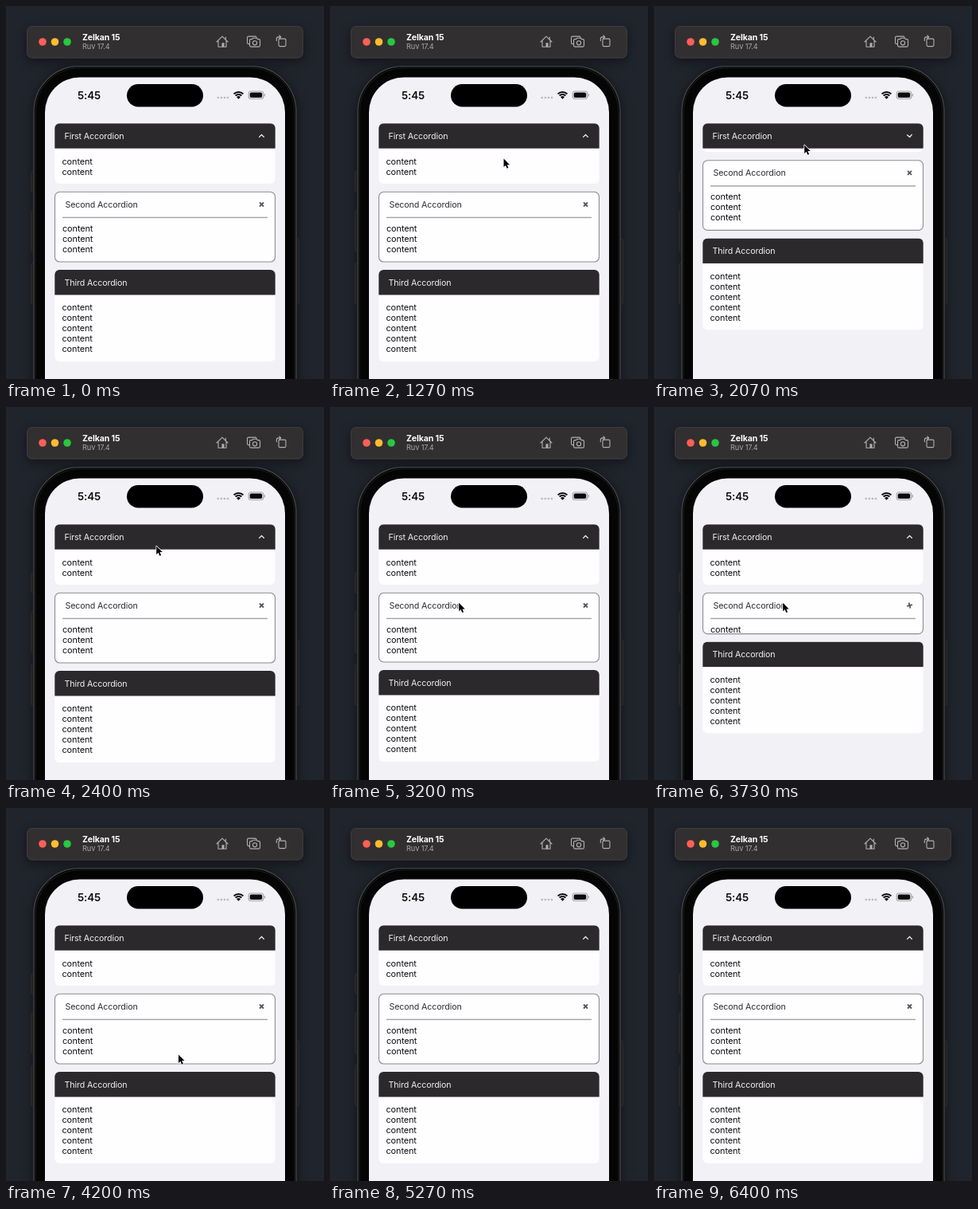
Recreate the animation shown at these times as an HTML page with a canvas. Size 400x468 px, loop 6.67 s.

```html
<!DOCTYPE html>
<html lang="en">
<head>
<meta charset="utf-8">
<title>Accordion demo</title>
<style>
html, body { margin: 0; width: 100%; height: 100%; overflow: hidden; background: #20242c; }
canvas { display: block; width: 400px; height: 468px; }
</style>
</head>
<body>
<canvas id="stage"></canvas>
<script>
const W = 400, H = 468, LOOP = 6670, FPS = 15;
const canvas = document.getElementById('stage');
const ctx = canvas.getContext('2d');
const dpr = window.devicePixelRatio || 1;
canvas.width = W * dpr;
canvas.height = H * dpr;

const FONT = 'Inter, Roboto, sans-serif';
const DARK = '#2c292c', PAPER = '#fefdff';
const TOGGLE = 400, HEADER = 31.5;

// Cursor path: time, x, y
const PATH = [
  [733, 250, 409], [933, 242, 322], [1133, 228, 228], [1267, 218, 191],
  [1333, 207, 184], [1467, 188.7, 174], [2400, 188.7, 174], [2600, 177, 207],
  [2800, 161, 245], [3000, 161.7, 245.3], [3930, 161.7, 245.3], [4200, 216.5, 309],
  [4333, 240, 405]
];

const clamp = v => Math.max(0, Math.min(1, v));
const ease = u => u < 0.5 ? 2 * u * u : 1 - 2 * (1 - u) * (1 - u);
const smooth = u => u * u * (3 - 2 * u);

function openness(t, closeAt, openAt) {
  return t < openAt ? 1 - ease(clamp((t - closeAt) / TOGGLE)) : ease(clamp((t - openAt) / TOGGLE));
}

function box(x, y, w, h, r, fill, stroke, lw = 1) {
  ctx.beginPath();
  ctx.roundRect(x, y, w, h, r);
  if (fill) { ctx.fillStyle = fill; ctx.fill(); }
  if (stroke) { ctx.strokeStyle = stroke; ctx.lineWidth = lw; ctx.stroke(); }
}

function disc(x, y, r, fill) {
  ctx.beginPath();
  ctx.arc(x, y, r, 0, Math.PI * 2);
  ctx.fillStyle = fill;
  ctx.fill();
}

function text(str, x, y, color, size = 10.65, weight = 400) {
  ctx.font = `${weight} ${size}px ${FONT}`;
  ctx.letterSpacing = '-0.1px';
  ctx.fillStyle = color;
  ctx.fillText(str, x, y);
}

function line(d, color, lw) {
  ctx.strokeStyle = color;
  ctx.lineWidth = lw;
  ctx.stroke(new Path2D(d));
}

function placed(x, y, angle, draw) {
  ctx.save();
  ctx.translate(x, y);
  ctx.rotate(angle);
  draw();
  ctx.restore();
}

function shadowed(blur, dy, color, draw) {
  ctx.save();
  ctx.shadowColor = color;
  ctx.shadowBlur = blur * dpr;
  ctx.shadowOffsetY = dy * dpr;
  draw();
  ctx.restore();
}

function toolbar() {
  shadowed(14, 4, 'rgba(0,0,0,.45)', () => box(26, 25, 348, 40.5, 7, '#322f31'));
  box(26.5, 25.5, 347, 39.5, 6.5, null, '#3f3c3e');
  ['#ff5f57', '#febc2e', '#28c840'].forEach((c, i) => disc(46 + i * 15.5, 45, 4.8, c));
  text('Zelkan 15', 96, 43, '#fff', 10.5, 700);
  text('Ruv 17.4', 96, 54.2, '#aaa7a9', 9.2);

  const grey = '#b3b0b2';
  ctx.lineJoin = ctx.lineCap = 'round';
  line('M265 45 L272 38.2 L279 45 M267 43.5 V51.3 H277 V43.5 M276.3 42 V39', grey, 1.1);
  box(271.5, 46.3, 3, 5, 0, grey);
  placed(.5, -.4, 0, () => {
    line('M305.5 48 H304.5 Q303 48 303 46.5 V40 Q303 38.5 304.5 38.5 H313 Q314.5 38.5 314.5 40', grey, 1.1);
    line('M307.5 42 H309 L310.2 40.7 H314.8 L316 42 H317.5 Q319 42 319 43.5 V50 Q319 51.5 317.5 51.5 H307.5 Q306 51.5 306 50 V43.5 Q306 42 307.5 42 Z', grey, 1.1);
    ctx.beginPath();
    ctx.arc(312.5, 46.7, 2.6, 0, Math.PI * 2);
    ctx.stroke();
    box(342.5, 41.5, 9, 9.5, 1.5, null, grey, 1.1);
    line('M339.8 44 V42 Q339.8 39.3 342.5 39.3 H345 M343.3 37.3 L345.3 39.3 L343.3 41.3', grey, 1.1);
  });
}

function phone() {
  [[31, 208, 25], [31, 257, 51], [31, 323, 51], [363, 292, 82]]
    .forEach(([x, y, h]) => box(x + .5, y, 5, h, 1.5, '#2b2b2d', '#414143', .6));
  shadowed(14, 3, 'rgba(0,0,0,.5)', () => box(34, 74.7, 332, 460, 58, '#171719'));
  box(35, 75.7, 330, 460, 57, '#050505', '#4b4b4d', 1.2);
  box(37, 77.7, 326, 460, 55, null, '#1d1d1f', 1);
  box(49, 89.4, 302, 440, 44, '#f2f1f5');
  box(152, 98, 96, 28.5, 14.2, '#000');
  text('5:45', 90, 117, '#0a0a0a', 13.3, 600);

  for (let i = 0; i < 4; i++) disc(266.7 + i * 4.1, 115, 1.35, '#bababe');
  ctx.lineCap = 'butt';
  [8.4, 5.4].forEach(r => {
    ctx.beginPath();
    ctx.arc(292.5, 116.3, r, -Math.PI * .75, -Math.PI * .25);
    ctx.strokeStyle = '#0a0a0a';
    ctx.lineWidth = 2;
    ctx.stroke();
  });
  ctx.beginPath();
  ctx.moveTo(292.5, 116.8);
  ctx.arc(292.5, 116.8, 3.5, -Math.PI * .75, -Math.PI * .25);
  ctx.fillStyle = '#0a0a0a';
  ctx.fill();
  box(305.2, 107, 18.5, 9.5, 3, null, '#a6a6aa', 1.1);
  box(306.7, 108.5, 15.5, 6.5, 1.8, '#0a0a0a');
  box(324.7, 110, 1.3, 3.6, .6, '#a6a6aa');
}

function lines(count, x, y) {
  for (let i = 0; i < count; i++) text('content', x, y + i * 13, '#0e0e10', 10.9);
}

function darkCard(title, y, count, height) {
  ctx.save();
  ctx.beginPath();
  ctx.roundRect(61.3, y, 277.4, HEADER + height, 6);
  ctx.clip();
  ctx.fillStyle = PAPER;
  ctx.fillRect(61, y, 278, HEADER + height);
  ctx.fillStyle = DARK;
  ctx.fillRect(61, y, 278, HEADER);
  lines(count, 70.5, y + 51.3);
  ctx.restore();
  text(title, 73.5, y + 19.6, '#f1eff1');
}

function outlineCard(y, open) {
  const h = 32.3 + 56 * open;
  box(61.5, y + .3, 277, h - .6, 6, PAPER, '#8d8c90', 1.1);
  text('Second Accordion', 74.5, y + 19.7, '#2e2d30');
  ctx.save();
  ctx.beginPath();
  ctx.rect(62, y + 1, 276, h - 2);
  ctx.clip();
  ctx.fillStyle = '#a3a2a6';
  ctx.fillRect(71, y + 31.7, 258, 1.4);
  lines(3, 71, y + 49.8);
  ctx.restore();
  placed(321.5, y + 16, (1 - open) * Math.PI / 4, () => {
    ctx.lineCap = 'butt';
    line('M-2.5 -2.5 L2.5 2.5 M2.5 -2.5 L-2.5 2.5', '#59575b', 1.9);
  });
}

function cursor(t) {
  const last = PATH.length - 1;
  if (t < PATH[0][0] - 1 || t > PATH[last][0] + 20) return;
  let i = 0;
  while (i < last - 1 && t > PATH[i + 1][0]) i++;
  const [t0, x0, y0] = PATH[i], [t1, x1, y1] = PATH[i + 1];
  const u = clamp((t - t0) / (t1 - t0));
  placed(x0 + (x1 - x0) * u, y0 + (y1 - y0) * u, 0, () => {
    const arrow = new Path2D('M.5 .5 V11 L2.9 8.8 L4.6 12.7 L6.4 11.9 L4.7 8.1 H8 Z');
    ctx.lineJoin = 'round';
    ctx.strokeStyle = '#fff';
    ctx.lineWidth = 1.5;
    ctx.stroke(arrow);
    ctx.fillStyle = '#000';
    ctx.fill(arrow);
  });
}

function draw(t) {
  ctx.setTransform(dpr, 0, 0, dpr, 0, 0);
  ctx.fillStyle = '#20242c';
  ctx.fillRect(0, 0, W, H);
  phone();
  toolbar();

  const first = openness(t, 1560, 1977);
  const second = openness(t, 3162, 3566);
  const y2 = 189 + 44 * first;
  darkCard('First Accordion', 147.2, 2, 44.3 * first);
  placed(321.5, 163, Math.PI * (1 - smooth(first)), () => {
    ctx.lineCap = ctx.lineJoin = 'round';
    line('M-2.9 1.4 L0 -1.5 L2.9 1.4', '#f4f2f4', 1.3);
  });
  outlineCard(y2, second);
  darkCard('Third Accordion', y2 + 42 + 56 * second, 5, 83.5);
  cursor(t);
}

const start = performance.now();
function tick() {
  const elapsed = (performance.now() - start) % LOOP;
  const step = Math.min(99, Math.floor((elapsed + 4) * FPS / 1000));
  draw(step * 1000 / FPS);
  requestAnimationFrame(tick);
}
tick();
</script>
</body>
</html>
```
